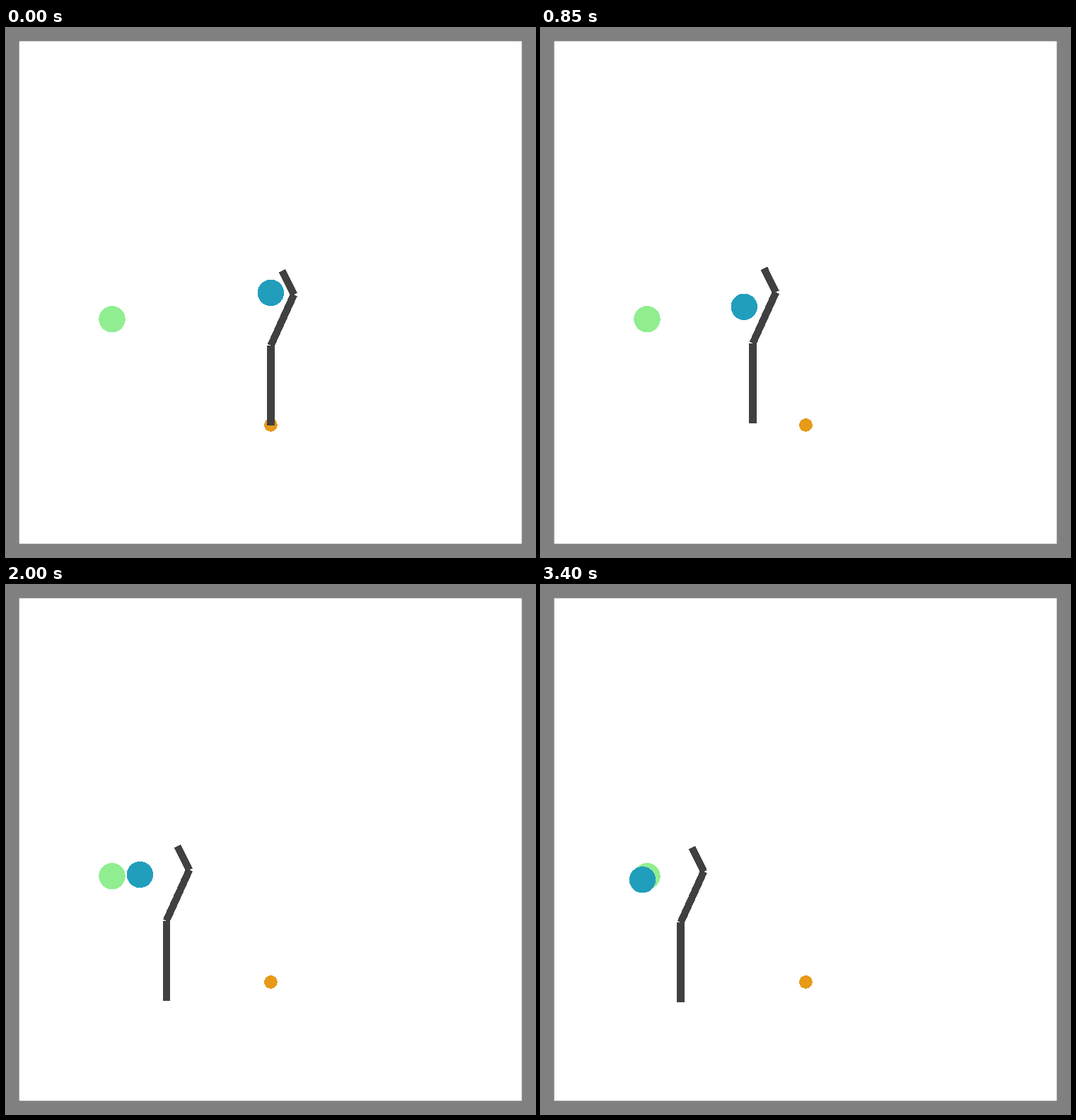
An HTML page for the animation above (3450 ms loop, 748 by 748 pixels).

```html
<!DOCTYPE html>
<html lang="en">
<head>
<meta charset="utf-8">
<title>Hook pushing a ball</title>
<style>
  html, body { margin: 0; width: 100%; height: 100%; overflow: hidden; background: #808080; }
  svg { display: block; width: 100vw; height: 100vh; }
</style>
</head>
<body>
<svg viewBox="0 0 748 748" shape-rendering="crispEdges">
  <rect width="748" height="748" fill="#808080"/>
  <rect x="18.7" y="18.7" width="710.6" height="710.6" fill="#fff" shape-rendering="auto"/>
  <circle cx="150" cy="411.8" r="18.7" fill="#90ee90"/>
  <circle cx="374.4" cy="561.4" r="9.4" fill="#e69a17"/>
  <circle id="ball" r="18.7" fill="#219ebc"/>
  <g id="tool" stroke="#404040" stroke-width="10.3">
    <path d="M0 0V-113"/>
    <path d="M0-113L32.6-184.9"/>
    <path d="M32.6-184.9L15.9-218.7"/>
  </g>
</svg>
<script>
const LOOP = 3450, STEP = 50;
const { exp, cos, floor, max } = Math;
const ball = document.getElementById('ball');
const tool = document.getElementById('tool');

// Lower end of the handle: eases left while it sinks, with a short jolt at the start.
function toolAt(t) {
  const lag = 57.5 * exp(-((t / 330) ** 1.5));
  const lift = 36.5 * exp(-(((t - 570) / 980) ** 2));
  const jolt = 4.3 * cos(t / 24) * exp(-t / 120);
  const rise = 2 * (t / 3400) ** 8;
  return [186 + 246 * exp(-0.0009 * t) - lag, 592.2 - lift - jolt - rise];
}

// Sliding to a stop under constant friction.
function slide(t) {
  const d = 2.049e-5 * (3500 - t) ** 2;
  return [143.3 + d, 416.8 - 0.157 * d];
}

// At rest until the hook hits it, then struck again by the arm.
function ballAt(t) {
  const hit = 65, second = 300, rest = 374.4;
  if (t >= second) return slide(t);
  const u = max(0, (t - hit) / (second - hit));
  return slide(second).map(v => rest + (v - rest) * u);
}

function place(el, [x, y]) {
  el.setAttribute('transform', `translate(${x} ${y})`);
}

const start = performance.now();
function tick() {
  const t = floor((performance.now() - start) % LOOP / STEP) * STEP;
  place(ball, ballAt(t));
  place(tool, toolAt(t));
  requestAnimationFrame(tick);
}
tick();
</script>
</body>
</html>
```
